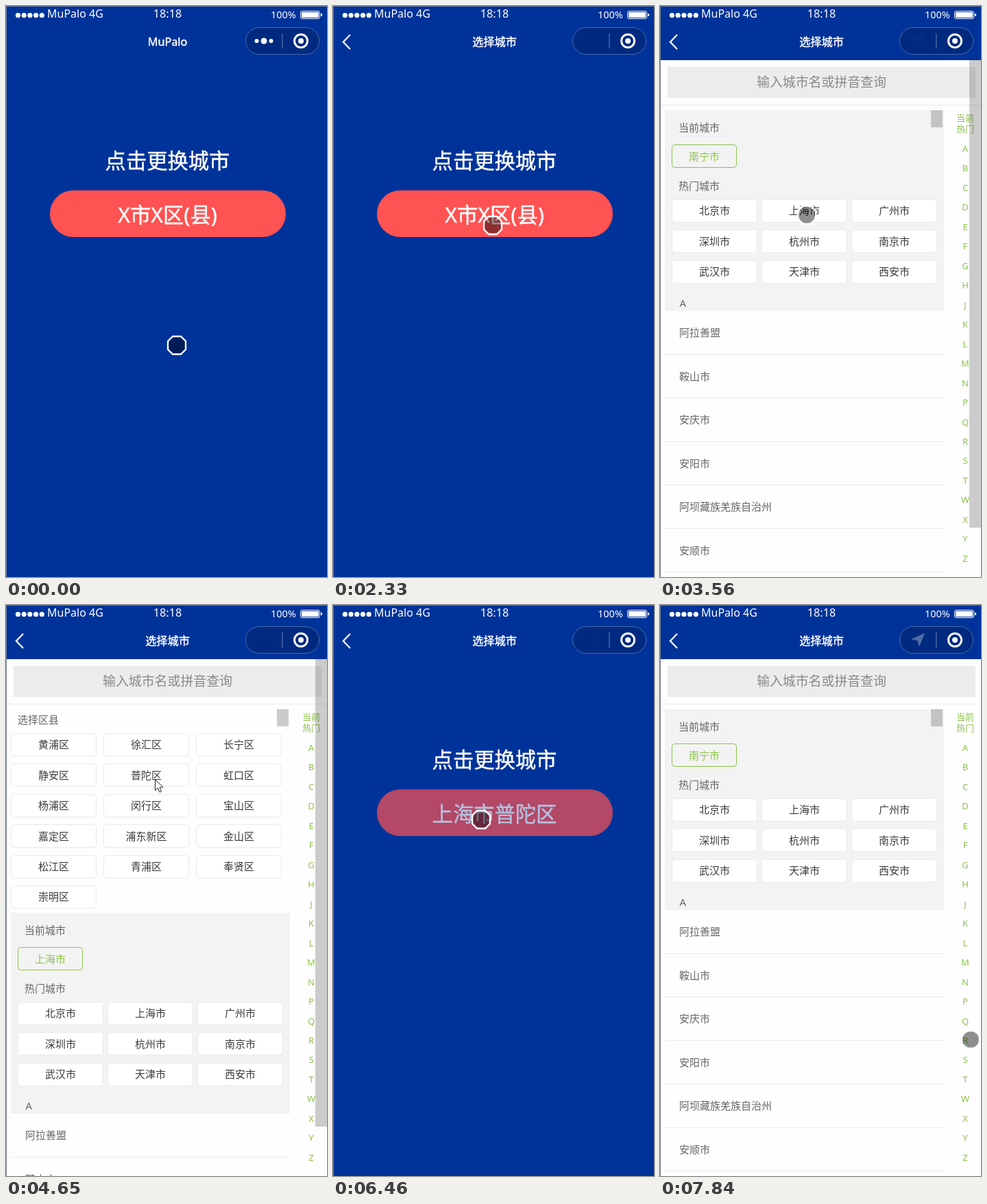
Recreate the animation shown at these times as an HTML page. Size 468 px wide and 833 px high, loop 7.99 s.

```html
<!DOCTYPE html>
<html lang="zh-CN">
<head>
<meta charset="utf-8">
<style>
  html, body { margin: 0; width: 100%; height: 100%; overflow: hidden; background: #039; }
  svg { display: block; width: 100%; height: 100%; }
  text { font-family: "Noto Sans", "Noto Sans CJK SC", "Noto Sans CJK", sans-serif; }
  .strong { stroke: #fff; stroke-width: .45px; }
</style>
</head>
<body>
<svg id="stage" viewBox="0 0 468 833"></svg>
<script>
const LOOP = 7990, GREEN = '#8bc34a', APP = 'MuPalo';

// Moments at which the screen refreshes.
const TICKS = [0, 270, 550, 690, 830, 980, 1120, 1260, 1400, 1670,
  2330, 2480, 2630, 2780, 2900, 3040, 3170, 3300, 3440, 3570, 3710, 3840, 3980, 4110, 4250, 4380,
  4530, 4650, 4790, 4920, 5060, 5190, 5330, 5460,
  6460, 6610, 6760, 6910, 7040, 7180, 7310, 7450, 7600, 7720, 7840];

// Pointer path: time, x, y.
const PATH = [[0, 249, 495], [270, 248, 495], [550, 244, 485], [980, 220, 400], [1400, 233, 320],
  [2900, 233, 320], [3300, 214, 305], [3710, 214, 305], [4380, 217, 254], [4920, 217, 254],
  [5460, 216, 313], [6460, 216, 313], [6760, 234, 356], [7450, 453, 700], [7840, 453, 634]];

const clamp = v => Math.max(0, Math.min(1, v));

// Text placed by the vertical centre of its glyphs.
const label = (str, x, cy, size, fill, anchor = 'middle', extra = '') =>
  `<text x="${x}" y="${cy + size * 0.37}" font-size="${size}" fill="${fill}" text-anchor="${anchor}" ${extra}>${str}</text>`;
const rect = (x, y, w, h, fill, extra = '') =>
  `<rect x="${x}" y="${y}" width="${w}" height="${h}" fill="${fill}" ${extra}/>`;
const disc = (x, y, r) => `<circle cx="${x}" cy="${y}" r="${r}" fill="#fff"/>`;
const rule = (x1, x2, y) => `<path d="M${x1} ${y}H${x2}" stroke="#eaeaea"/>`;

const buttonGrid = (names, left, top, pitch) => names.split(' ').map((name, i) => {
  const x = left + i % 3 * pitch, y = top + Math.floor(i / 3) * 44.45;
  return rect(x + .5, Math.round(y) + .5, 124, 33, '#fff', 'rx="4" stroke="#e9e9e9"') +
    label(name, x + 62.5, y + 16.6, 15, '#3a3a3a');
}).join('');

const statusBar =
  [0, 1, 2, 3, 4].map(i => disc(17.5 + i * 8.7, 13.5, 3.6)).join('') +
  label(APP + ' 4G', 60, 10.8, 16, '#fff', 'start') +
  label('18:18', 235.5, 10.8, 16.2, '#fff') +
  label('100%', 386, 12.2, 14.4, '#fff', 'start') +
  rect(429.5, 7.5, 28, 11, 'none', 'rx="2.5" stroke="#fff"') +
  rect(431, 9, 25, 8, '#fff', 'rx="1"') +
  rect(459, 11, 2, 4, '#fff', 'rx="1"');

const capsule =
  rect(349.5, 31.5, 107, 39, 'rgba(0,0,0,.17)', 'rx="19.5" stroke="rgba(255,255,255,.27)"') +
  rect(402, 40, 1.5, 22, 'rgba(255,255,255,.27)') +
  `<g id="dots">${disc(365.5, 51, 3)}${disc(376, 51, 4.5)}${disc(386.5, 51, 3)}</g>` +
  '<path id="locate" d="M386 41L366 50L375.5 52L378 61Z" fill="#fff"/>' +
  '<circle cx="430" cy="51" r="9.5" fill="none" stroke="#fff" stroke-width="3"/>' + disc(430, 51, 4);

const home = label('点击更换城市', 235.5, 225.6, 30.3, '#fff', 'middle', 'class="strong"') +
  `<g id="pick">${rect(64, 269, 344, 68, '#ff5252', 'rx="34"')}` +
  label('', 235.5, 304.7, 30.3, '#fff', 'middle', 'id="place" class="strong"') + '</g>';

const districts = label('选择区县', 17, 167.6, 15, '#666', 'start') +
  buttonGrid('黄浦区 徐汇区 长宁区 静安区 普陀区 虹口区 杨浦区 闵行区 宝山区 嘉定区 浦东新区 金山区 松江区 青浦区 奉贤区 崇明区', 7, 187, 135);

const cityList = rect(7, 152, 407, 293, '#f3f3f3') +
  label('当前城市', 27, 177.7, 15, '#666', 'start') +
  rect(17.5, 202.5, 94, 33, 'none', `rx="4" stroke="${GREEN}"`) +
  label('', 64.5, 219.5, 15, GREEN, 'middle', 'id="current"') +
  label('热门城市', 27, 262.6, 15, '#666', 'start') +
  buttonGrid('北京市 上海市 广州市 深圳市 杭州市 南京市 武汉市 天津市 西安市', 17, 282, 131) +
  label('A', 28.5, 433.3, 15, '#666', 'start') +
  '阿拉善盟 鞍山市 安庆市 安阳市 阿坝藏族羌族自治州 安顺市'.split(' ').map((name, i) =>
    label(name, 28, 476.5 + i * 63.5, 15, '#666', 'start') +
    rule(7, 414, Math.floor(508 + i * 63.5) + .5)).join('');

const letterIndex = label('当前', 445, 163.5, 13, GREEN) + label('热门', 445, 179.5, 13, GREEN) +
  [...'ABCDEFGHJKLMNPQRSTWXYZ'].map((c, i) => label(c, 445, 208 + i * 28.48, 13, GREEN)).join('');

const picker = rect(1, 79, 467, 754, '#fefefe') +
  rect(11, 89, 449, 45, '#ececec') +
  label('输入城市名或拼音查询', 235.5, 111.3, 18.9, '#888') +
  rule(1, 468, 144.5) +
  `<g id="districts">${districts}</g><g id="cities">${cityList}</g>` + letterIndex +
  rect(395, 152, 17, 25, 'rgba(0,0,0,.2)') +
  rect(451, 79, 17, 682, 'rgba(0,0,0,.2)', 'id="scrollbar"');

const pointer = `<g id="touch"><circle r="12" fill="rgba(0,0,0,.44)"/>
  <path d="M-6-13H6L13-6V6L6 13H-6L-13 6V-6Z" fill="none" stroke="#fff" stroke-width="2.3"/></g>
  <path id="arrow" d="M.5 .5V16.5L4.3 13L7 19L9.5 18L7 12H12Z" fill="#fff" stroke="#222"/>`;

const $ = id => document.getElementById(id);
$('stage').innerHTML = rect(0, 0, 468, 833, '#039') + home +
  `<g id="picker">${picker}</g>` + statusBar +
  '<path id="back" d="M25 42L15 52.5L25 63" fill="none" stroke="#fff" stroke-width="2.3"/>' +
  label('', 235.5, 52, 16.2, '#fff', 'middle', 'id="title" class="strong"') + capsule +
  '<path d="M0 833V0H468" fill="none" stroke="#8c8c8c" stroke-width="1.6"/>' +
  `<g id="pointer">${pointer}</g>`;

const show = (id, on) => $(id).style.display = on ? '' : 'none';
const move = (id, x, y) => $(id).setAttribute('transform', `translate(${x} ${y})`);

function pointerAt(t) {
  const next = PATH.findIndex(p => p[0] > t);
  if (next < 0) return PATH[PATH.length - 1].slice(1);
  const [t0, x0, y0] = PATH[next - 1], [t1, x1, y1] = PATH[next];
  const p = (t - t0) / (t1 - t0);
  return [x0 + (x1 - x0) * p, y0 + (y1 - y0) * p];
}

function pickerOffset(t) {
  const slideIn = (start, length) => 467 * (1 - clamp((t - start) / length)) ** 2;
  if (t < 4790) return slideIn(2330, 300);
  if (t < 5460) return 467 * clamp((t - 4790) / 400) ** 2;
  return slideIn(6535, 380);
}

function draw(t) {
  const choosing = t >= 1670 && t < 4790 || t >= 6460;
  const locating = t >= 2330 && t < 4790 || t >= 6460;
  const chosen = t >= 3570 && t < 5460;
  const offset = pickerOffset(t);

  $('title').textContent = choosing ? '选择城市' : APP;
  show('back', t >= 1670);
  show('dots', !choosing);
  const blink = Math.sin(Math.PI * (t - (t < 6460 ? 2330 : 6460)) / 1160) ** 2;
  $('locate').setAttribute('opacity', locating ? blink : 0);

  $('place').textContent = t < 4650 ? 'X市X区(县)' : '上海市普陀区';
  $('pick').setAttribute('opacity', t >= 1670 && t < 2330 || t >= 6460 ? .7 : 1);

  show('picker', offset < 467);
  move('picker', Math.round(offset), 0);
  show('districts', chosen);
  move('cities', 0, chosen ? 297 : 0);
  $('current').textContent = chosen ? '上海市' : '南宁市';
  show('scrollbar', t < 5460);

  const arrow = t >= 4530 && t < 4790;
  show('arrow', arrow);
  show('touch', !arrow);
  move('pointer', ...pointerAt(t).map(Math.round));
}

function tick() {
  const now = performance.now() % LOOP;
  draw(TICKS.filter(t => t <= now).pop());
  requestAnimationFrame(tick);
}
tick();
</script>
</body>
</html>
```
